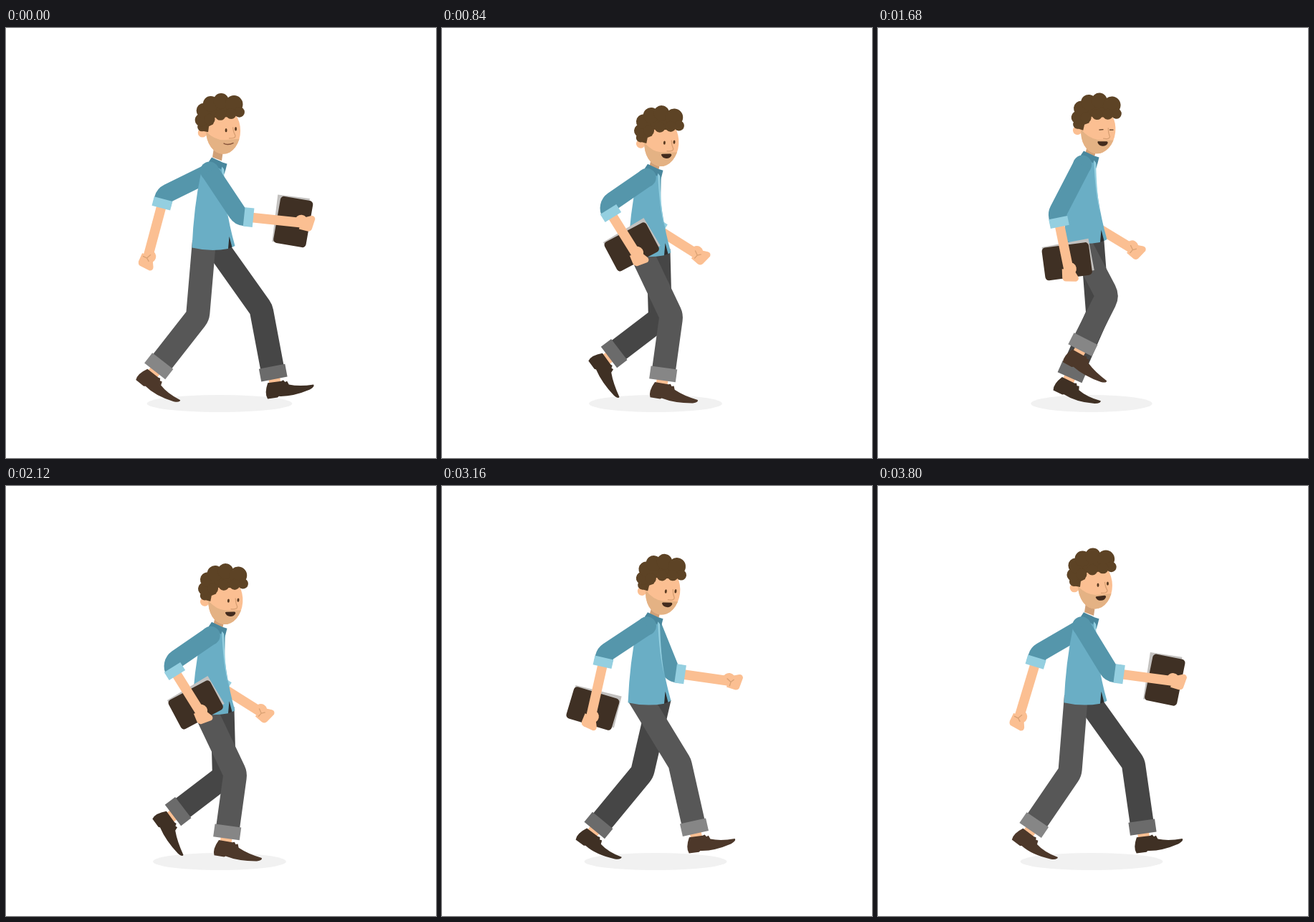
Animation, 600 px wide and 600 px high, one loop 3840 ms. Source, as an HTML page with a canvas:

```html
<!DOCTYPE html>
<html lang="en">
<head>
<meta charset="utf-8">
<title>Walk cycle</title>
<style>
  html, body { margin: 0; width: 100%; height: 100%; overflow: hidden; background: #fff; }
  canvas { display: block; width: 600px; height: 600px; }
</style>
</head>
<body>
<canvas id="stage" width="600" height="600"></canvas>
<script>
const ctx = document.getElementById('stage').getContext('2d');
const CYCLE = 1280, HALF = CYCLE / 2;
const SKIN = '#fbbf92', SLEEVE = '#5596ab', SHIRT = '#6aaec5', LIGHT = '#94cfe0', HAIR = '#5d4325', DARK = '#3f3024';

// Sum of harmonics of the walk cycle; each term is [amplitude, time of its peak].
const wave = (t, mean, ...terms) => terms.reduce((sum, [amplitude, peak], i) =>
  sum + amplitude * Math.cos((i + 1) * (t - peak) * 2 * Math.PI / CYCLE), mean);

const legPose = t => ({
  kx: wave(t, 303, [32.2, 624], [3.4, 320]),
  ky: wave(t, 395, [10.6, 1136], [10.2, 138], [3.1, 200]),
  ax: wave(t, 275, [68.3, 670], [8.3, -39], [7.4, 213]),
  ay: wave(t, 476.3, [19.9, 923], [8.5, 33], [2.5, 166]),
  angle: wave(t, 24.4, [26, 89], [9.6, 276], [2.5, 308]),
  bend: Math.min(0, wave(t, -5.8, [4.5, 451], [5.4, 229]))
});

const armPose = t => ({
  ex: wave(t, 267.5, [50.9, 27], [8.5, -27]),
  ey: wave(t, 255.5, [16.3, 83], [8.4, 279]),
  hx: wave(t, 316.8, [105, -22], [5.4, 260]),
  hy: wave(t, 313.4, [25, 551], [15.8, 330], [2.9, 213])
});

// The far limbs run half a cycle later, set off and with a slightly longer stride.
function farLegPose(t) {
  const pose = legPose(t + HALF);
  return { ...pose, kx: 318 + (pose.kx - 300) * 1.2, ax: 212 + (pose.ax - 212) * 1.115 };
}
function farArmPose(t) {
  const pose = armPose(t + HALF);
  return { ...pose, ex: pose.ex - 4, hx: pose.hx - 11 };
}

function fill(color, path) {
  ctx.fillStyle = color;
  ctx.fill(new Path2D(path));
}
function ellipse(color, x, y, rx, ry = rx) {
  ctx.fillStyle = color;
  ctx.beginPath();
  ctx.ellipse(x, y, rx, ry, 0, 0, 7);
  ctx.fill();
}
function stroke(color, width, path) {
  ctx.strokeStyle = color;
  ctx.lineWidth = width;
  ctx.stroke(new Path2D(path));
}
// A bent tube: sharp on the inside of the joint, round on the outside.
function tube(color, width, x, y, jointX, jointY, [endX, endY]) {
  ctx.strokeStyle = color;
  ctx.lineWidth = width;
  ctx.beginPath();
  ctx.moveTo(x, y);
  ctx.arcTo(jointX, jointY, endX, endY, width / 2);
  ctx.lineTo(endX, endY);
  ctx.stroke();
}
function placed(x, y, angle, draw) {
  ctx.save();
  ctx.translate(x, y);
  ctx.rotate(angle);
  draw();
  ctx.restore();
}
const rad = degrees => degrees * Math.PI / 180;

// Point at a distance d from (x, y) in the direction of an angle.
const ray = (x, y, angle) => d => [x + Math.cos(angle) * d, y + Math.sin(angle) * d];

function shoe(color, bend) {
  fill(color, `M-10 0 L9 0 L12 -1 L14 2 L17 1 L19 6 Q33 ${13 + bend * .3} 53 ${17 + bend}
    Q55 ${20 + bend} 47 ${22 + bend * .8} Q22 ${25 + bend * .2} 3 20.5 L1 22 L-13 22 Q-17 14 -10 0Z`);
}

function leg({ kx, ky, ax, ay, angle, bend }, hx, hy, cloth, cuff, leather) {
  const along = ray(ax, ay, Math.atan2(ay - ky, ax - kx));
  stroke(SKIN, 16, `M${along(-6)} L${along(8)}`);
  placed(...along(4), rad(angle), () => shoe(leather, bend));
  tube(cloth, 33, hx, hy, kx, ky, along(-16));
  stroke(cuff, 37, `M${along(-18)} L${along(0)}`);
}

function tablet() {
  placed(-16, 0, rad(4), () => {
    ctx.fillStyle = '#c3c1bf';
    placed(-2, -2, rad(-3), () => ctx.fillRect(-24, -33, 45, 66));
    ctx.fillStyle = DARK;
    ctx.beginPath();
    ctx.roundRect(-23, -33, 46, 66, 5);
    ctx.fill();
  });
}

function fist(creased) {
  ellipse(SKIN, -5, -2, 9);
  fill(SKIN, 'M-3 -7 L8 -11 Q13 -12 14 -7 L11 7 Q10 11 5 11 L-7 9Z');
  if (creased) stroke('#d9a173', 1.3, 'M-8 -3 L-2 1 L-3 7 M-2 1 L2 -3');
}

function arm({ ex, ey, hx, hy }, sx, sy, isNear) {
  const angle = Math.atan2(hy - ey, hx - ex), along = ray(ex, ey, angle);
  if (isNear) placed(hx, hy, angle, tablet);
  stroke(SKIN, 13.5, `M${along(10)} L${hx} ${hy}`);
  placed(hx, hy, angle, () => fist(!isNear));
  ellipse(SLEEVE, sx, sy, 13);
  tube(SLEEVE, 25.5, sx, sy, ex, ey, along(14));
  stroke(LIGHT, 26.5, `M${along(6)} L${along(19)}`);
}

function shirt() {
  fill('#2d2d2d', 'M312 288 L308 309 L316 306Z');
  fill(SHIRT, `M272 203 L284 186 L302 190 Q304 250 319.5 304.5 L315.5 306.5 L311.5 291 L310 308.5
    Q285 313 259.5 307 Q262 250 272 203Z`);
  fill(LIGHT, 'M301 192 L304 195 Q305 240 310 268 Q303 240 301 192Z');
}

function collar() {
  fill('#49879d', 'M287 181 L302 188 L308.5 190 L306 200 L301.5 194 L300 198 L283 187Z');
}

function face(blinking, talking) {
  ellipse(SKIN, 274, 149, 6.3);
  ctx.save();
  ctx.beginPath();
  ctx.ellipse(303, 146, 24, 32.5, 0, 0, 7);
  ctx.clip();
  fill(SKIN, 'M275 110 H330 V180 H275Z');
  fill('#e4b284', 'M275 143 Q289 159 304 159 L330 157 V182 H275Z');
  ctx.restore();

  stroke('#d79f72', 1.3, 'M316.5 141 Q317 148 320 153 Q320 157 311 156.5');
  if (blinking) stroke('#5a3b22', 1.3, 'M304 145 L310 144 M318.5 143.5 L324 143');
  else {
    ellipse('#5a3b22', 307, 145.3, 1.5, 2.7);
    ellipse('#5a3b22', 320.5, 143.3, 1.5, 2.7);
  }
  if (talking) fill('#422b1d', 'M304 163 Q303 161 306 161 L316 160 Q318.5 160 318 162.5 Q316 167 311 167 Q306 167 304 163Z');
  else stroke('#86543a', 1.3, 'M303.5 163.5 Q309 167 317.5 163');
}

function hair() {
  fill(HAIR, 'M268 124 L285 105 L318 106 L328 122 L308 127 L291 128 L289 137 L283 140 L282 148 L272 146Z');
  const curl = (x, y, r) => ellipse(HAIR, x, y, r);
  curl(273.5, 140.5, 6.5);
  curl(272.5, 131, 9);
  curl(276, 118, 10.5);
  curl(285.5, 108.5, 10.8);
  curl(300, 104.5, 10.8);
  curl(318, 109, 12.3);
  curl(325.5, 120, 7.3);
  for (let i = 0; i < 3; i++) curl(314 - 15 * i, 122 + 2 * i * i, 7.5);
}

function draw(now) {
  const t = now % CYCLE;
  const bob = wave(t, -1.2, [0, 0], [11, 155]);
  const tilt = wave(t, 3.5, [3.7, 555]);
  const drop = wave(t, 2.8, [3.6, 600], [1.5, 280]);
  const swing = wave(t, 0, [1, 40]);

  ctx.fillStyle = '#fff';
  ctx.fillRect(0, 0, 600, 600);
  ellipse('#f1f1f1', 298, 524, wave(t, 93, [0, 0], [9, 40]), 12);

  arm(farArmPose(t), 293, 198 + bob, false);
  leg(farLegPose(t), 297 - 7 * swing, 300 + bob, '#464646', '#6b6b6b', DARK);
  leg(legPose(t), 275.5 + swing, 298 + bob, '#575757', '#868686', '#4d382a');

  placed(0, bob, 0, () => {
    shirt();
    placed(296.5 - swing / 2, 181 + drop, rad(tilt), () => {
      ctx.translate(-296, -181);
      fill('#d0a077', 'M290 170 L303 174 L301 188 L288 183Z');
      face(t >= 360 && t < 480, t >= 320);
      hair();
    });
    collar();
  });
  arm(armPose(t), 285 - swing, 200 + bob, true);
}

(function frame() {
  draw(performance.now());
  requestAnimationFrame(frame);
})();
</script>
</body>
</html>
```
